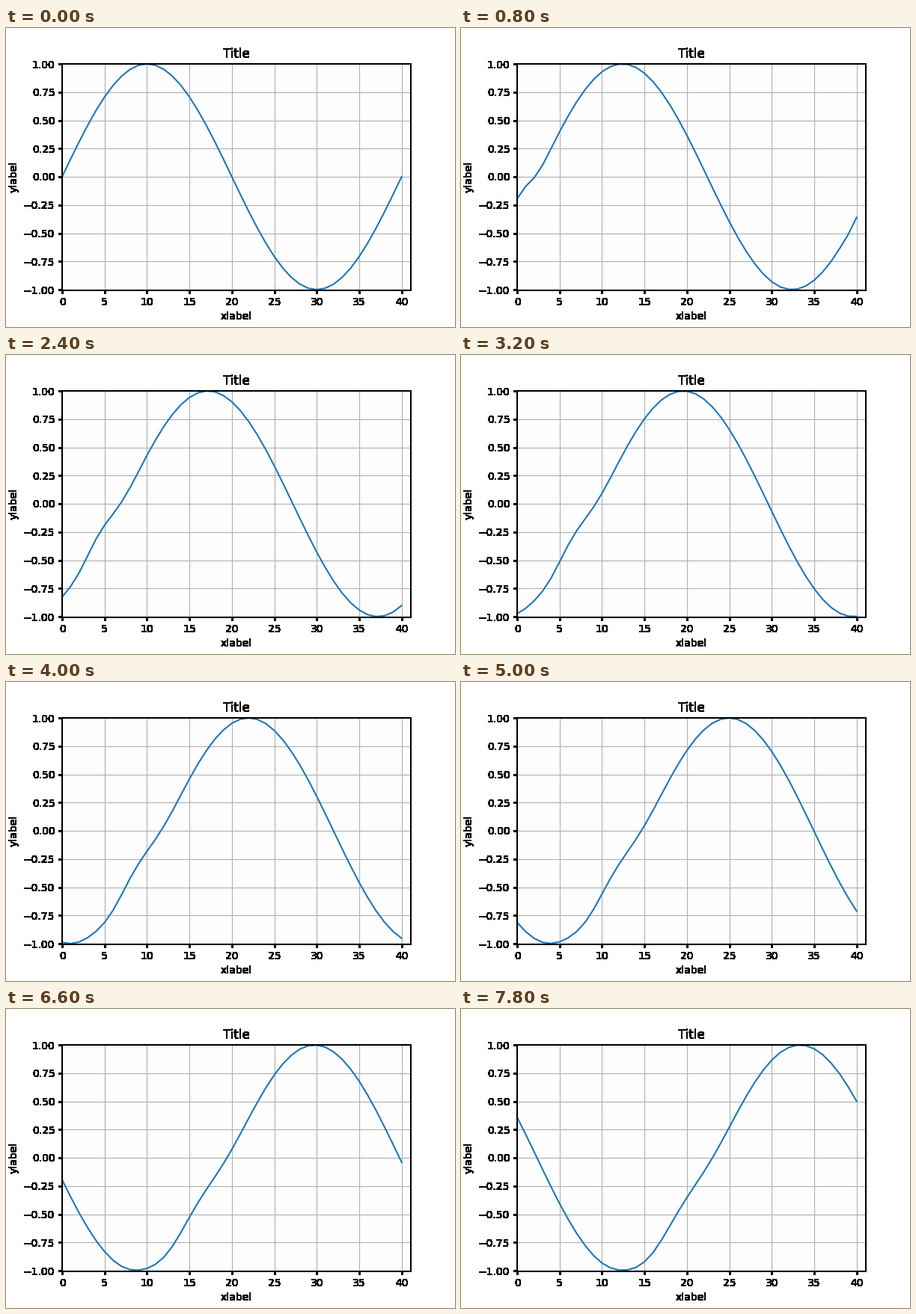
A matplotlib script that plays this animation: 600x400 px, repeating every 8000 ms.

```python
import numpy as np
import matplotlib.pyplot as plt
from matplotlib.animation import FuncAnimation

FRAMES, INTERVAL = 40, 200
POINTS = 41
COURANT = 0.6
BOX = [0.125, 0.125, 0.825 - 0.05, 0.88 - 0.125]

plt.rcParams.update({"font.family": "DejaVu Sans", "font.size": 10})


def advect(u, c=COURANT):
    """One Lax-Wendroff step to the right on a periodic grid."""
    left, right = np.roll(u, 1), np.roll(u, -1)
    return u - c / 2 * (right - left) + c**2 / 2 * (right - 2 * u + left)


def wave(step):
    u = np.sin(2 * np.pi * np.arange(POINTS) / (POINTS - 1))
    for _ in range(step):
        u = advect(u)
    return u


def harden(img, dpi):
    """Turn every touched pixel solid black."""
    out = np.zeros_like(img)
    out[..., 3] = img[..., 3] > 0
    return out, 0, 0


def make_axes(face):
    ax = fig.add_axes(BOX, facecolor=face)
    ax.set(xlim=(0, 41), ylim=(-1, 1),
           xticks=np.arange(0, 41, 5), yticks=np.linspace(-1, 1, 9))
    return ax


fig = plt.figure(figsize=(6, 4), dpi=100, facecolor="white")

# Hard-edged frame and lettering underneath
back = make_axes("none")
back.set(title="Title", xlabel="xlabel", ylabel="ylabel")
for part in (back.title, back.xaxis, back.yaxis, *back.spines.values()):
    part.set_agg_filter(harden)

# Smooth plot area on top
ax = make_axes("#fdfdfd")
ax.tick_params(length=0, labelbottom=False, labelleft=False)
ax.grid(True, color="#b0b0b0", linewidth=0.8)
line, = ax.plot(np.arange(POINTS), wave(0), color="#1f77b4", linewidth=1.5)


def update(step):
    line.set_ydata(wave(step))
    return line,


anim = FuncAnimation(fig, update, frames=FRAMES, interval=INTERVAL,
                     repeat=True, repeat_delay=0)
plt.show()
```
